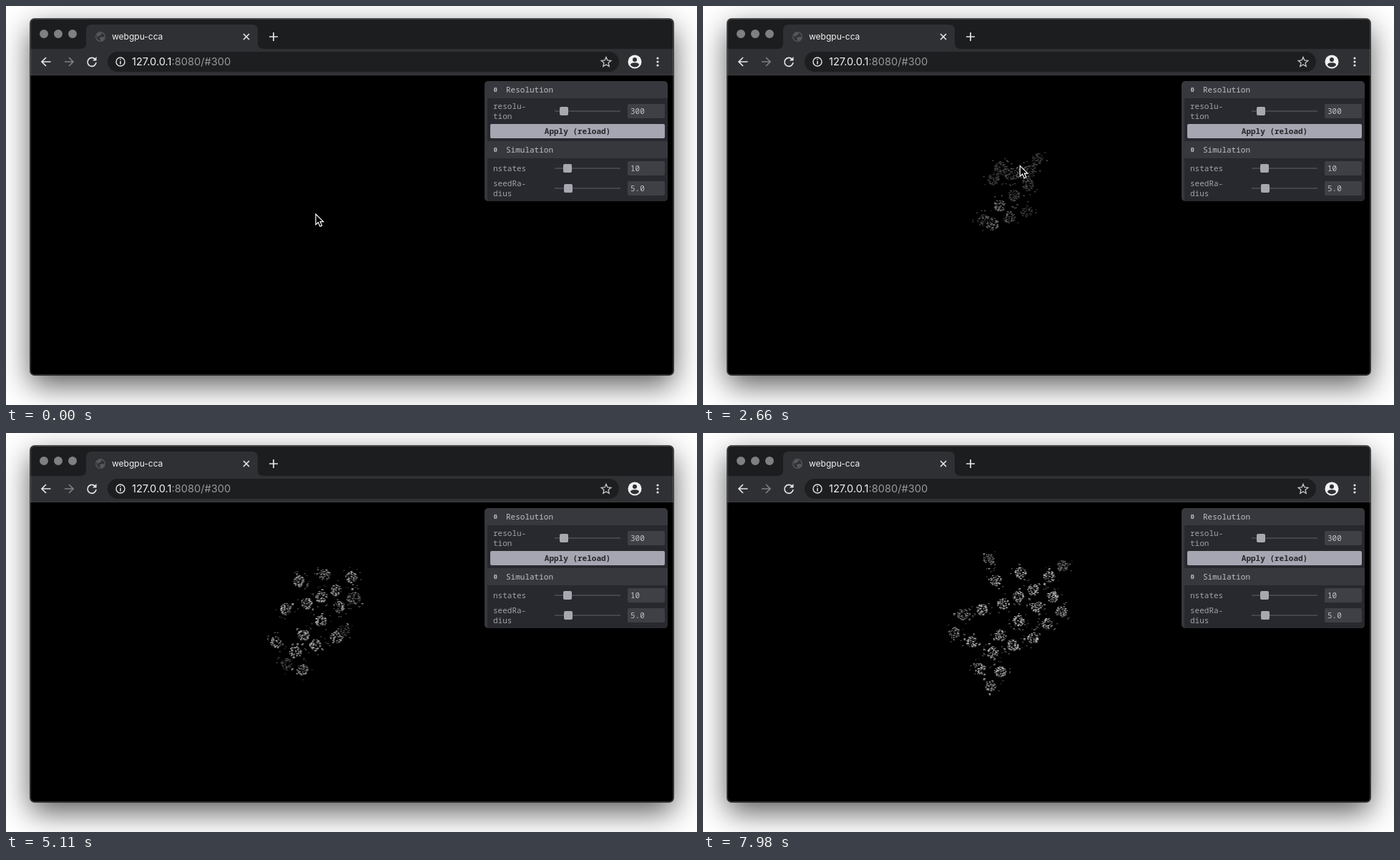
Animation, 966 px wide and 558 px high, one loop 8000 ms. Source, as an HTML page with a canvas:

```html
<!DOCTYPE html>
<html lang="en">
<head>
<meta charset="utf-8">
<title>webgpu-cca</title>
<style>
  html, body { margin: 0; width: 100%; height: 100%; overflow: hidden; background: #fff; }
  .window { position: absolute; left: 34px; top: 18px; width: 899px; height: 498px; border-radius: 6px;
    background: #000; box-shadow: 0 0 0 1px rgba(0,0,0,.7), 0 14px 42px rgba(0,0,0,.65); }
  canvas, svg { position: absolute; left: 0; top: 0; }
  .ui { font-family: Inter, sans-serif; fill: #f1f1f2; }
  .mono { font: 11px "Noto Sans Mono", monospace; fill: #a2a3aa; white-space: pre; }
  .title { fill: #bfc0c7; }
  .line { fill: none; stroke: #e4e5e7; stroke-width: 1.7; }
  .light { fill: #e4e5e7; }
</style>
</head>
<body>
<div class="window"></div>
<canvas id="stage" width="966" height="558"></canvas>
<svg width="966" height="558" viewBox="0 0 966 558">
  <!-- browser frame -->
  <path d="M34 97V24a6 6 0 0 1 6-6H927a6 6 0 0 1 6 6V97z" fill="#1c1d1f"/>
  <path d="M34 60H104q8 0 8-8V34q0-8 8-8H344q8 0 8 8V52q0 8 8 8H933V97H34z" fill="#2f3033"/>
  <path d="M34 96.5H933" stroke="#3c3d40"/>
  <rect x="142" y="64" width="715" height="28" rx="14" fill="#1d1e20"/>
  <path d="M53 39h0M73 39h0M93 39h0" stroke="#7f8081" stroke-width="12" stroke-linecap="round"/>
  <circle cx="132" cy="43" r="6.3" fill="#303134" stroke="#58595c" stroke-width="1.3"/>
  <path d="M127 40l4-3 3 1-2 3-3 1 0 3zM131 44l5-1 2 2-4 4-2-1z" fill="#58595c"/>
  <g class="ui">
    <text x="148" y="47" font-size="12">webgpu-cca</text>
    <text x="176" y="83" font-size="14.6">127.0.0.1<tspan fill="#97989b">:8080/#300</tspan></text>
  </g>
  <g class="line">
    <path d="M332 39l8 8M340 39l-8 8M368 43h12M374 37v12"/>
    <path d="M62.5 78H51M56 72l-6 6 6 6"/>
    <path d="M82 78H93.5M88 72l6 6-6 6" stroke="#7e7f82"/>
    <path d="M124.5 74.3A6 6 0 1 0 126 79"/>
    <circle cx="160" cy="78" r="6" stroke-width="1.4"/>
    <path d="M160 77v4.5M160 74v1.6" stroke-width="1.5"/>
    <path d="M839 71.5l1.9 4.500 4.900.4-3.700 3.200 1.100 4.800-4.200-2.500-4.200 2.500 1.100-4.800-3.700-3.200 4.900-.4z" stroke="#c8c9cb" stroke-width="1.3"/>
  </g>
  <path class="light" d="M126.5 71V76.5H121z"/>
  <circle cx="879" cy="78" r="9.5" fill="#f1f2f3"/>
  <circle cx="879" cy="75" r="3" fill="#2f3033"/>
  <path d="M873 82.5q0-3.200 6-3.200t6 3.200q-2.200 3-6 3t-6-3z" fill="#2f3033"/>
  <path d="M911 73h0M911 78h0M911 83h0" stroke="#e4e5e7" stroke-width="3.2" stroke-linecap="round"/>

  <!-- control panel -->
  <rect x="669" y="105" width="256" height="168" rx="5" fill="#37383d"/>
  <path d="M673 129H925V189H673zM673 213H925V268a5 5 0 0 1-5 5H673z" fill="#28292e"/>
  <g id="panel" class="mono">
    <text x="681" y="144">resolu-</text><text x="681" y="158">tion</text>
    <text x="681" y="231">nstates</text>
    <text x="681" y="252">seedRa-</text><text x="681" y="266">dius</text>
    <rect x="677" y="165" width="244" height="20" rx="2" fill="#a5a6b1"/>
    <text x="799" y="179" text-anchor="middle" font-weight="700" style="fill:#25262a">Apply (reload)</text>
  </g>
  <rect x="34.5" y="18.5" width="898" height="497" rx="5.5" fill="none" stroke="#fff" stroke-opacity=".18"/>
  <path id="cursor" d="M0 0V14.800L3.400 11.600 6 17.300 8.700 16.100 6.200 10.700H10.700z" fill="#000" stroke="#fff" stroke-width="1.2"/>
</svg>
<script>
const LOOP = 8000, STEP = 70, PIXEL = 1.4, SPREAD = 8, SETTLE = 1000;
const DRAW = 750, DIVIDE = 1900, MATURE = 400, SPACING = 27, NEXT_BUD = 3800;
const ctx = document.getElementById('stage').getContext('2d');
const cursor = document.getElementById('cursor');
const panel = document.getElementById('panel');
const clamp = (v, lo = 0, hi = 1) => Math.min(hi, Math.max(lo, v));
const lerp = (a, b, k) => a.map((v, i) => v + (b[i] - v) * k);
const distance = (a, b) => Math.hypot(a[0] - b[0], a[1] - b[1]);

function addFolder(y, label) {
  panel.insertAdjacentHTML('beforeend', `
    <text class="title" x="699" y="${y + 4}">${label}</text>
    <path d="M683.500 ${y - 3}q-1.500 3 0 6M685 ${y - 3}q1.500 3 0 6" fill="none" stroke="#b4b5bd" stroke-width="1.600"/>`);
}

function addSlider(y, knob, value) {
  panel.insertAdjacentHTML('beforeend', `
    <rect x="767" y="${y - 1}" width="92" height="2" fill="#45464c"/>
    <rect x="${knob - 6}" y="${y - 6}" width="12" height="12" rx="2" fill="#a7a8b0"/>
    <rect x="869" y="${y - 10}" width="52" height="20" rx="2" fill="#3f4046"/>
    <text class="title" x="873" y="${y + 4}">${value}</text>`);
}

addFolder(117, 'Resolution');
addFolder(201, 'Simulation');
addSlider(147, 780, '300');
addSlider(227, 785, '10');
addSlider(255, 786, '5.0');

// Each hand-drawn stroke turns into three cells that drift from one line to another
const strokes = [
  { drawn: [[404, 300], [441, 287]], rest: [[404, 306], [461, 286]] },
  { drawn: [[440, 259], [413, 274]], rest: [[466, 242], [415, 282]] },
  { drawn: [[452, 245], [439, 231]], rest: [[461, 218], [419, 238]] }
];
const cells = strokes.flatMap(({ drawn, rest }, s) => [0, .5, 1].map(k => ({
  birth: DRAW + 300 * s + 250 * k, from: lerp(...drawn, k), to: lerp(...rest, k)
})));

// The colony reaches these tips in turn, each by budding from the nearest mature cell
const tips = [
  [347, 277], [359, 254], [398, 172], [506, 182], [415, 333], [443, 195],
  [488, 228], [386, 329], [481, 266], [501, 250], [400, 355]
];
tips.forEach((tip, i) => {
  const start = 2000 + 37 * i * i;
  const root = cells.filter(c => c.birth < start - MATURE).map(c => c.to)
    .reduce((a, b) => distance(a, tip) < distance(b, tip) ? a : b);
  const count = distance(root, tip) > 1.5 * SPACING ? 2 : 1;
  for (let n = 0; n < count; n++) cells.push({
    birth: start + n * NEXT_BUD,
    from: lerp(root, tip, n / count), to: lerp(root, tip, (n + 1) / count)
  });
});

const pointer = [
  { time: 0, at: [433, 291] }, { time: 450, at: [433, 291] },
  ...strokes.flatMap(({ drawn }, s) => drawn.map((at, k) => ({ time: DRAW + 300 * s + 250 * k, at }))),
  { time: 1890, at: [426, 220] }, { time: 2400, at: [426, 220] },
  { time: 3100, at: [481, 231] }, { time: 3900, at: [481, 231] }
];

function random(x, y, z) {
  let h = Math.imul(x, 374761393) ^ Math.imul(y, 668265263) ^ Math.imul(z, 1274126177);
  h = Math.imul(h ^ h >>> 15, 2246822519);
  h = Math.imul(h ^ h >>> 13, 3266489917);
  return ((h ^ h >>> 16) >>> 0) / 2 ** 32;
}

function cellAt({ birth, from, to }, t) {
  const age = t - Math.max(birth, DIVIDE);
  const lag = age > 0 ? Math.exp(-age / SETTLE) : 1;
  const travel = distance(from, to) * lag * clamp(age / 500);
  const [x, y] = lerp(to, from, lag);
  return { x, y, weight: clamp((t - birth) / 300), shade: 1 - Math.min(.6, travel * .08) };
}

// Grey level of one grid point from its distance to the merged cell bodies
function level(col, row, d, shade, t, step) {
  const noise = random(col, row, step), grain = random(row, col, step + 500);
  const young = t < DIVIDE;
  if (d < (young ? 6.5 : 8)) return noise < (d > 4 ? .6 : .4) ? shade * (.15 + .85 * grain) : 0;
  const rim = young ? 10.5 : 13;
  if (d > rim && d < rim + 1) return noise < .12 ? .15 + .35 * grain : 0;
  // small remnants left between the bodies
  const density = .35 * clamp((t - 2800) / 4500);
  const inSpot = col % 5 < 2 && row % 5 < 2;
  if (d > 9.5 && d < 13 && inSpot && random(col / 5 | 0, row / 5 | 0, step >> 3) < density)
    return noise < .7 ? .25 + .6 * grain : 0;
  return 0;
}

function drawColony(t, step) {
  ctx.clearRect(0, 0, 966, 558);
  const alive = cells.filter(c => c.birth < t).map(c => cellAt(c, t));
  if (!alive.length) return;
  for (let row = 106; row < 270; row++) for (let col = 230; col < 378; col++) {
    const x = col * PIXEL, y = row * PIXEL;
    let field = 0, shade = 0;
    for (const c of alive) {
      const d2 = (x - c.x) ** 2 + (y - c.y) ** 2;
      if (d2 > 600) continue;
      const pull = c.weight * Math.exp(-d2 / SPREAD ** 2);
      field += pull;
      shade += pull * c.shade;
    }
    if (field < .03) continue;
    const d = SPREAD * Math.sqrt(Math.max(0, -Math.log(field)));
    const grey = Math.round(255 * level(col, row, d, shade / field, t, step));
    if (!grey) continue;
    ctx.fillStyle = `rgb(${grey},${grey},${grey})`;
    ctx.fillRect(x, y, PIXEL, PIXEL);
  }
}

function movePointer(t) {
  const next = pointer.findIndex(p => p.time > t);
  cursor.style.display = next < 0 ? 'none' : '';
  if (next < 0) return;
  const a = pointer[next - 1], b = pointer[next];
  const k = (t - a.time) / (b.time - a.time);
  cursor.setAttribute('transform', `translate(${lerp(a.at, b.at, k * k * (3 - 2 * k))})`);
}

let shown = -1;
function frame() {
  const step = Math.floor(performance.now() % LOOP / STEP);
  if (step !== shown) {
    shown = step;
    drawColony(step * STEP, step);
    movePointer(step * STEP);
  }
  requestAnimationFrame(frame);
}
frame();
</script>
</body>
</html>
```
